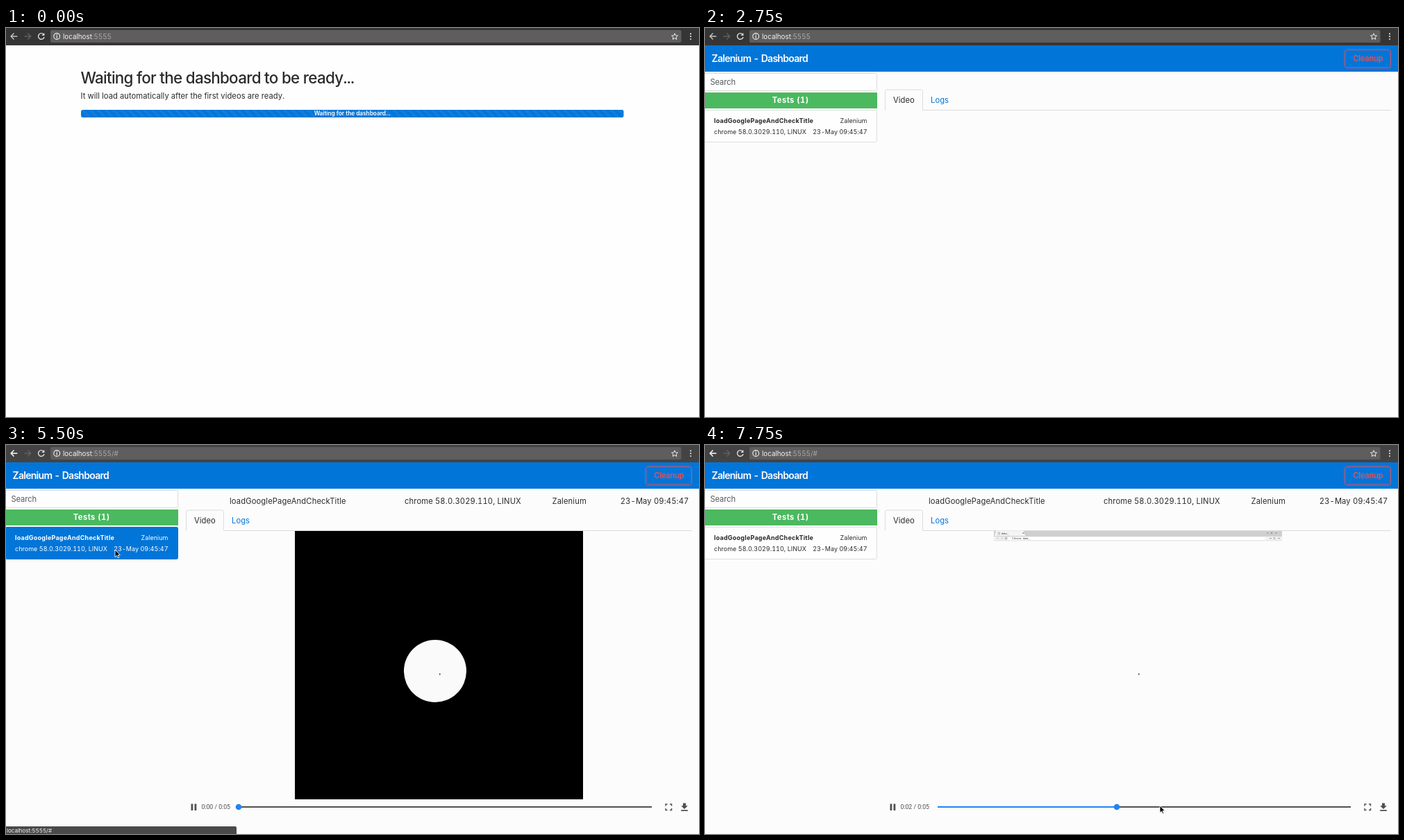
Write an HTML page that moves like this. It is 998 px wide and 561 px high and loops after 8000 ms.

```html
<!DOCTYPE html>
<html lang="en">
<head>
<meta charset="utf-8">
<title>Dashboard</title>
<style>
html, body { margin: 0; width: 100%; height: 100%; overflow: hidden; background: #fefefe; }
svg { display: block; width: 998px; height: 561px; }
text { font: 11.2px Inter, "Open Sans", sans-serif; font-variant-numeric: tabular-nums; letter-spacing: .05px; fill: currentColor; white-space: pre; }
.h { font-size: 22.4px; font-weight: 500; letter-spacing: -.71px; }
.nav { font-size: 14px; font-weight: 600; letter-spacing: -.72px; }
.row { letter-spacing: .13px; }
.url { font-size: 9.8px; letter-spacing: 0; }
.s { font-size: 8.96px; }
.b { font-weight: 700; letter-spacing: .25px; }
.count { font-weight: 700; letter-spacing: .45px; }
.tiny { font-size: 3.6px; }
.time { font: 8.7px Roboto, sans-serif; letter-spacing: 0; }
.mid { text-anchor: middle; }
.end { text-anchor: end; }
.ln { fill: none; stroke: currentColor; }

/* Every timeline is 8 s long; one 250 ms tick is 3.125 %. */
.t { animation: 8s step-end infinite; }
.wait { animation-name: wait; }
.dash { animation-name: dash; }
.plain { animation-name: plain; }
.open { animation-name: open; }
.item { animation-name: item; }
.fill { animation-name: fill; }
.chrome { animation-name: chrome; }
.tabs { animation-name: tabs; }
.status { animation-name: status; }
.load { animation-name: load; }
.play { animation-name: play; }
.sec0 { animation-name: sec0; }
.sec1 { animation-name: sec1; }
.sec2 { animation-name: sec2; }
.half { animation-name: half; }
.full { animation-name: full; }
.ptr { animation-name: ptr; }
.knob { animation-name: knob; }
.bar { animation-name: bar; transform-origin: 335px 0; }
.stripes { animation: slide 2s steps(8) infinite; }

@keyframes slide { to { transform: translateX(-11.2px); } }
@keyframes wait { 34.375%, to { visibility: hidden; } }
@keyframes dash { 0% { visibility: hidden; } 34.375%, to { visibility: visible; } }
@keyframes plain { 0% { visibility: visible; } 65.625%, to { visibility: hidden; } }
@keyframes open { 0% { visibility: hidden; } 65.625%, to { visibility: visible; } }
@keyframes chrome { 0% { fill: #363535; } 50%, to { fill: #444343; } }
@keyframes item { 0% { color: #292b2c; } 65.625% { color: #fff; } 87.5%, to { color: #292b2c; } }
@keyframes fill {
  0% { fill: #fefefe; stroke: #dedede; }
  56.25% { fill: #f7f7f9; stroke: #dedede; }
  65.625% { fill: #0275d8; stroke: #0275d8; }
  87.5%, to { fill: #fefefe; stroke: #dedede; }
}
@keyframes tabs { 0% { transform: none; } 65.625%, to { transform: translateY(5px); } }
@keyframes status { 0% { visibility: hidden; } 56.25% { visibility: visible; } 81.25%, to { visibility: hidden; } }
@keyframes load { 0% { visibility: hidden; } 65.625% { visibility: visible; } 68.75%, to { visibility: hidden; } }
@keyframes play { 0% { visibility: hidden; } 68.75%, to { visibility: visible; } }
@keyframes sec0 { 0% { visibility: hidden; } 68.75% { visibility: visible; } 84.375%, to { visibility: hidden; } }
@keyframes sec1 { 0% { visibility: hidden; } 84.375% { visibility: visible; } 96.875%, to { visibility: hidden; } }
@keyframes sec2 { 0% { visibility: hidden; } 96.875%, to { visibility: visible; } }
@keyframes half { 0% { visibility: hidden; } 87.5% { visibility: visible; } 93.75%, to { visibility: hidden; } }
@keyframes full { 0% { visibility: hidden; } 93.75%, to { visibility: visible; } }
@keyframes ptr {
  0% { visibility: hidden; transform: translate(420px, 330px); }
  50% { visibility: visible; transform: translate(420px, 330px); }
  53.125% { transform: translate(290px, 235px); }
  56.25% { transform: translate(180px, 160px); }
  59.375% { transform: translate(157px, 151px); }
  78.125% { transform: translate(310px, 232px); }
  81.25% { transform: translate(534px, 354px); }
  84.375% { transform: translate(612px, 455px); }
  87.5% { transform: translate(654px, 516px); }
  90.625% { transform: translate(656px, 518px); }
  93.75%, to { visibility: visible; transform: translate(655px, 520px); }
}
@keyframes knob {
  0% { transform: none; }
  71.875% { transform: translateX(0); animation-timing-function: steps(3); }
  81.25% { transform: translateX(86px); animation-timing-function: steps(3); }
  90.625% { transform: translateX(200px); animation-timing-function: steps(2); }
  96.875%, to { transform: translateX(258px); }
}
@keyframes bar {
  0% { transform: scaleX(0); }
  71.875% { transform: scaleX(0); animation-timing-function: steps(3); }
  81.25% { transform: scaleX(86); animation-timing-function: steps(3); }
  90.625% { transform: scaleX(200); animation-timing-function: steps(2); }
  96.875%, to { transform: scaleX(258); }
}
</style>
</head>
<body>
<svg viewBox="0 0 998 561" color="#292b2c">
  <defs>
    <pattern id="stripe" width="11.2" height="11.2" patternUnits="userSpaceOnUse">
      <path d="M0 5.6V11.2H5.6ZM0 0H5.6L11.2 5.6V11.2Z" fill="#fff" fill-opacity=".06"/>
    </pattern>
    <clipPath id="track"><rect x="108" y="118" width="781.5" height="11" rx="2.8"/></clipPath>
    <path id="pause" d="M266.5 517.5h2.8v9.5h-2.8zM271.5 517.5h2.8v9.5h-2.8z" fill="currentColor"/>
    <path id="tools" class="ln" d="M0 0h3M6 -1.2l2 2.4M8 -1.2l-2 2.4M12 0h3" stroke-width=".7" color="#777"/>
    <path id="back" class="ln" d="M16.3 12H7.5M11.5 7.6L7.1 12L11.5 16.4"/>
    <!-- left part of the recorded browser's tab strip and toolbar -->
    <g id="tab">
      <path d="M417 133.5l2.5-7.5h39l3 7.5z" fill="#f4f4f4"/>
      <rect x="422" y="128.5" width="2.6" height="3" fill="none" stroke="#777" stroke-width=".5"/>
      <text class="tiny" x="427" y="131.4">data:,</text>
      <path class="ln" d="M457.5 128.6l2 2m0-2l-2 2" stroke-width=".5"/>
      <path class="ln" d="M420 137h3m3 0h3" color="#aaa" stroke-width=".6"/>
      <circle cx="433.5" cy="137" r="1.3" fill="none" stroke="#666" stroke-width=".6"/>
    </g>
  </defs>

  <!-- waiting page -->
  <g class="t wait">
    <rect y="25" width="998" height="536" fill="#fefefe"/>
    <text class="h" x="107.5" y="79.5">Waiting for the dashboard to be ready...</text>
    <text x="107.5" y="102">It will load automatically after the first videos are ready.</text>
    <g clip-path="url(#track)">
      <rect x="108" y="118" width="782" height="11" fill="#0275d8"/>
      <rect class="stripes" x="108" y="118" width="800" height="11" fill="url(#stripe)"/>
    </g>
    <text class="mid" x="498.5" y="126.2" color="#fff" style="font-size:8.4px;font-weight:600;letter-spacing:-.08px">Waiting for the dashboard...</text>
  </g>

  <!-- dashboard -->
  <g class="t dash">
    <rect y="25" width="998" height="536" fill="#fcfcfc"/>
    <rect y="25" width="998" height="38" fill="#0275d8"/>
    <text class="nav" x="9.5" y="49" color="#fff">Zalenium - Dashboard</text>
    <g color="#e0525a">
      <rect class="ln" x="921.5" y="31.5" width="66" height="26" rx="2.8"/>
      <text class="mid" x="954.8" y="48" style="font-weight:600;letter-spacing:-.3px">Cleanup</text>
    </g>
    <rect x="-.5" y="65.5" width="248" height="25" rx="2" fill="#fefefe" stroke="#dcdcdc"/>
    <text x="7.5" y="81.8" color="#55595c" style="letter-spacing:-.1px">Search</text>
    <rect y="93" width="248" height="23" fill="#4bb95f"/>
    <text class="count mid" x="123.2" y="108.4" color="#fff">Tests (1)</text>

    <g class="t item">
      <rect class="t fill" x="-.5" y="118.5" width="248" height="46" rx="2"/>
      <text class="s b" x="13" y="136.5">loadGooglePageAndCheckTitle</text>
      <text class="s end" x="233.5" y="136.5">Zalenium</text>
      <text class="s" x="13" y="152.7">chrome 58.0.3029.110, LINUX</text>
      <text class="s end" x="233.5" y="152.7">23-May 09:45:47</text>
    </g>

    <g class="t tabs">
      <path class="ln" d="M259.5 118.5V91.5q0-2.5 2.5-2.5H311q2.5 0 2.5 2.5V118.5H988" color="#dcdcdc"/>
      <text x="271" y="108">Video</text>
      <text x="325" y="108" color="#0275d8">Logs</text>
    </g>
  </g>

  <!-- selected test -->
  <g class="t open">
    <text class="row" x="322" y="84.5">loadGooglePageAndCheckTitle</text>
    <text class="row" x="574" y="84.5">chrome 58.0.3029.110, LINUX</text>
    <text class="row" x="786.5" y="84.5">Zalenium</text>
    <text class="row end" x="983.5" y="84.5">23-May 09:45:47</text>
  </g>

  <g class="t load" color="#a4a4a4">
    <use href="#pause"/>
    <text class="time" x="281.5" y="525">0:00</text>
    <rect x="311" y="521.5" width="667" height="1" fill="#ececec"/>
    <circle cx="310.7" cy="522" r="4.2" fill="#a3c9f2"/>
  </g>

  <!-- video player -->
  <g class="t play">
    <rect x="416" y="124" width="415" height="387"/>
    <circle cx="618" cy="326" r="45" fill="#fafafa"/>
    <g class="t half">
      <rect x="416" y="124" width="229" height="387" fill="#fefefe"/>
      <rect x="416" y="124" width="229" height="9.5" fill="#d2d2d2"/>
      <rect x="416" y="133.5" width="229" height="7" fill="#f0f0f0"/>
      <rect x="431" y="134.5" width="193" height="5" fill="#fff"/>
      <path class="ln" d="M416 140.5H645" color="#ccc" stroke-width=".5"/>
      <path class="ln" d="M645 124V511" color="#8a8a8a"/>
      <use href="#tab"/>
      <text class="tiny" x="443" y="138.4">Chrome  data:,</text>
      <use href="#tools" x="624" y="127"/>
      <use href="#tools" x="626" y="137"/>
    </g>
    <g class="t full">
      <rect x="416" y="124" width="415" height="387" fill="#fcfcfc"/>
      <rect x="416" y="124" width="415" height="8.5" fill="#cfcfcf"/>
      <rect x="416" y="132" width="415" height="6" fill="#f0f0f0"/>
      <rect x="436" y="132.8" width="372" height="4.4" fill="#fff"/>
      <path class="ln" d="M416 138H831" color="#ccc" stroke-width=".5"/>
      <use href="#tab" y="-2.5"/>
      <text class="tiny" x="442" y="135.8">Chrome  data:,</text>
      <use href="#tools" x="809" y="127"/>
      <use href="#tools" x="813" y="134.5"/>
    </g>
    <rect x="624" y="329.5" width="1.5" height="2" fill="#333"/>

    <g color="#505050">
      <use href="#pause"/>
      <text class="time t sec0" x="281.5" y="525">0:00 / 0:05</text>
      <text class="time t sec1" x="281.5" y="525">0:01 / 0:05</text>
      <text class="time t sec2" x="281.5" y="525">0:02 / 0:05</text>
      <rect x="335" y="521" width="595" height="2" fill="currentColor"/>
      <rect class="t bar" x="335" y="521" width="1" height="2" fill="#2383f2"/>
      <circle class="t knob" cx="335" cy="522" r="4.3" fill="#2383f2"/>
      <path class="ln" d="M950 520.5V518H952.5M956 518H958.5V520.5M958.5 524V526.5H956M952.5 526.5H950V524" stroke-width="1.5"/>
      <path d="M975 516.5h4v3.8h2.8l-4.8 4.7l-4.8-4.7h2.8zM972.2 526.3h9.6v1.6h-9.6z" fill="currentColor"/>
    </g>
  </g>

  <g class="t status">
    <path d="M0 561V550H330q2 0 2 2V561Z" fill="#4b4a4a"/>
    <text x="1" y="558.7" color="#f4f4f4" style="font-size:8px;letter-spacing:0">localhost:5555/#</text>
  </g>

  <!-- browser toolbar -->
  <rect class="t chrome" width="998" height="25"/>
  <rect x="64" y="3" width="908.5" height="18" rx="2" fill="#5f5d5d"/>
  <g fill="none" stroke-width="1.4">
    <use href="#back" class="t plain" color="#c4c4c4"/>
    <use href="#back" class="t open" color="#fff"/>
    <path d="M26.5 12H35.3M31.3 7.6L35.7 12L31.3 16.4" stroke="#626161"/>
    <path d="M54.2 9.3A4.3 4.3 0 1 0 55 13" stroke="#dedede"/>
    <path d="M55.4 7V11H51.4Z" fill="#dedede"/>
    <circle cx="73.2" cy="12" r="4.4" stroke="#f2f2f2" stroke-width="1.1"/>
    <path d="M73.2 9.2V10.4M73.2 11.3V14.8" stroke="#f2f2f2" stroke-width="1.2"/>
    <path d="M963 7.8L964.3 10.8L967.5 11.1L965.1 13.2L965.8 16.4L963 14.7L960.2 16.4L960.9 13.2L958.5 11.1L961.7 10.8Z" stroke="#f0f0f0" stroke-width="1"/>
  </g>
  <g fill="#d8d8d8">
    <circle cx="986" cy="8.4" r="1.1"/><circle cx="986" cy="12.2" r="1.1"/><circle cx="986" cy="16" r="1.1"/>
  </g>
  <text class="url" x="82" y="15.5" color="#f6f6f6">localhost<tspan fill="#aaa9a9">:5555<tspan class="t open">/#</tspan></tspan></text>

  <path class="t ptr" d="M0 0V10.6L2.5 8.3L4.2 12L5.8 11.3L4.2 7.7H7.4Z" fill="#000" stroke="#fff" stroke-width=".9"/>
</svg>
</body>
</html>
```
